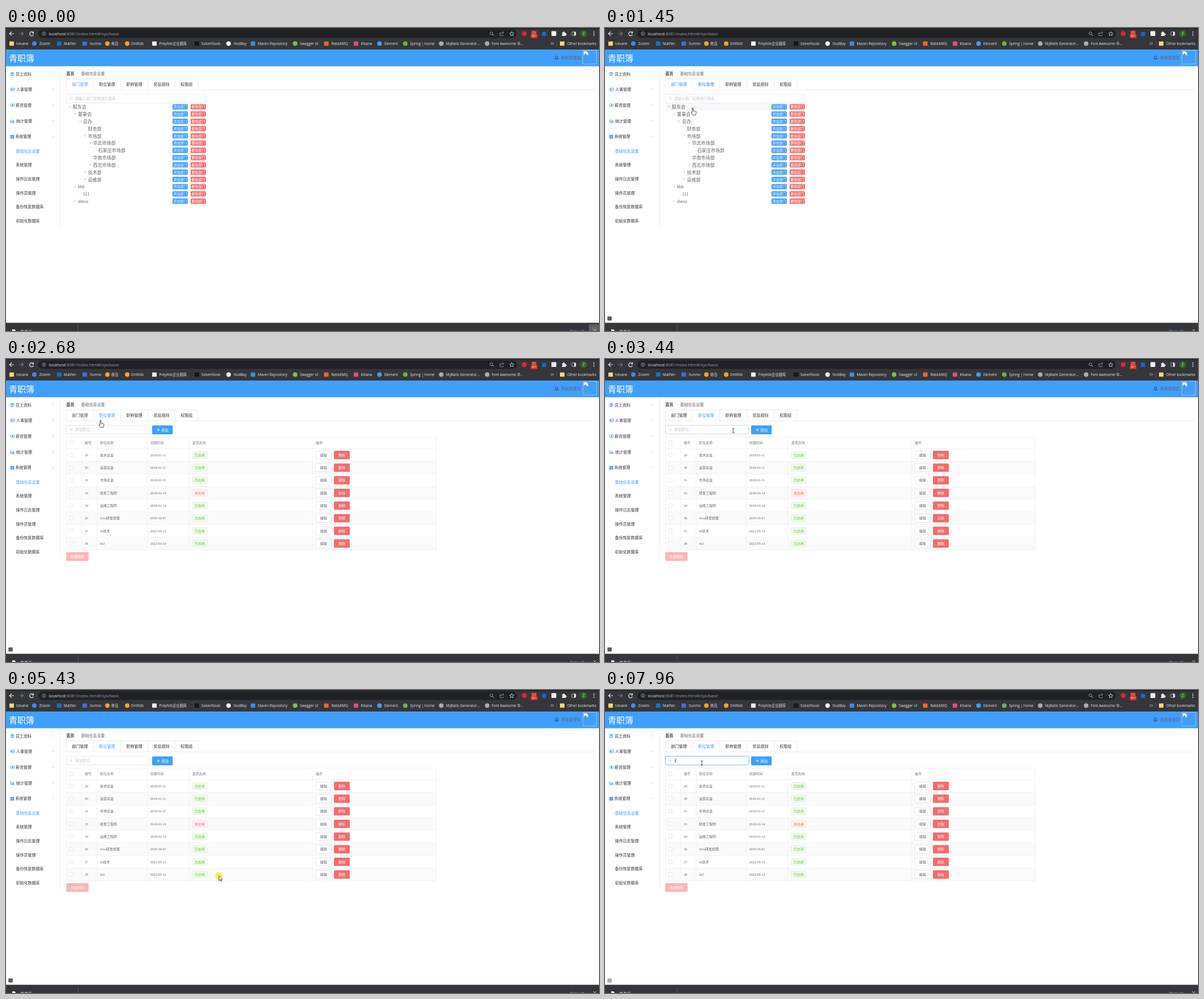
An HTML page for the animation above (8000 ms loop, 1047 px wide and 535 px high).

```html
<!DOCTYPE html>
<html>
<head>
<meta charset="utf-8">
<style>
html, body { margin: 0; width: 100%; height: 100%; overflow: hidden; background: #fff; }
svg { display: block; }
text { white-space: pre; font-family: "Liberation Serif", "Noto Sans CJK SC", "Noto Sans CJK", serif; }
.ui { font-family: "Open Sans", "Noto Sans CJK SC", "Noto Sans CJK", sans-serif; }
</style>
</head>
<body>
<svg id="stage" width="1047" height="535" viewBox="0 0 1047 535"></svg>
<script>
const LOOP = 8000;
const BLUE = '#409eff', RED = '#f56c6c', INK = '#303133', BODY = '#606266', MUTED = '#c0c4cc', LINE = '#ebeef5';

// Markup helpers; text is placed by its vertical centre.
const text = (x, cy, str, size = 7, fill = INK, attrs = '') =>
  `<text x="${x}" y="${cy + size * .37}" font-size="${size}" fill="${fill}" ${attrs}>${str}</text>`;
const middle = 'text-anchor="middle"';
const rect = (x, y, w, h, fill, attrs = '') =>
  `<rect x="${x}" y="${y}" width="${w}" height="${h}" fill="${fill}" ${attrs}/>`;
const box = (x, y, w, h, stroke, fill = '#fff', attrs = '') =>
  rect(x, y, w, h, fill, `rx="1.5" stroke="${stroke}" stroke-width=".7" ${attrs}`);
const dot = (x, y, r, fill, attrs = '') => `<circle cx="${x}" cy="${y}" r="${r}" fill="${fill}" ${attrs}/>`;
const line = (d, stroke, width = .7, attrs = '') =>
  `<path d="${d}" fill="none" stroke="${stroke}" stroke-width="${width}" ${attrs}/>`;
const shape = (d, fill, attrs = '') => `<path d="${d}" fill="${fill}" ${attrs}/>`;
const group = (id, body, attrs = '') => `<g id="${id}" ${attrs}>${body}</g>`;
const button = (x, cy, w, h, fill, label, size = 6) =>
  rect(x, cy - h / 2, w, h, fill, 'rx="1.5"') +
  text(x + w / 2, cy, label, size, '#fff', middle + ' font-weight="500"');

function browserTop() {
  const white = '#e8eaed', grey = '#9aa0a6';
  let s = rect(0, 0, 1047, 38, '#35363a') + rect(0, 0, 1047, 1.5, '#202124') +
    rect(57, 2.5, 845, 15, '#202124', 'rx="7.5"');
  s += line('M14 10H6.5M10 6.3L6.3 10L10 13.7', white, 1.2);
  s += line('M23 10h7.5M27 6.3L30.7 10L27 13.7', '#7d7f83', 1.1);
  s += line('M48 8A3.5 3.5 0 1 0 48.5 11.5M48.5 6v3h-3', white, 1.2);
  s += dot(67, 10, 3.2, 'none', `stroke="${grey}" stroke-width=".8"`) + line('M67 9.5v2.2M67 8v.8', white, .9);
  s += text(75.5, 10, `localhost<tspan fill="${grey}">:8081/index.html#/sys/basic</tspan>`, 7.2, white, 'class="ui"');
  s += dot(857, 9.3, 2.4, 'none', `stroke="${grey}"`) + line('M859 11.2l2.3 2.4', grey, 1.1);
  s += line('M874 8.5h-2v5h6v-2M873.5 11q0-3 5-3M876.8 6l2.2 2l-2.2 2', grey, .8);
  s += line('M893 6.3l1.1 2.5 2.7.3-2 1.8.6 2.7-2.4-1.4-2.4 1.4.6-2.7-2-1.8 2.7-.3Z', white, .8);
  s += dot(915, 10, 4.4, '#e0242b') + rect(928, 5, 8.5, 7, '#e34b3d', 'rx="1"') +
    rect(926.5, 11, 12, 7, '#d93025', 'rx="1.5"') + text(932.5, 14.5, '99+', 5, '#fff', 'class="ui" ' + middle);
  s += rect(946.5, 7, 7, 7, '#1967d2') + rect(963, 5.5, 8.5, 8.5, '#f1f1f1', 'rx="1"');
  s += shape('M981.5 8h2v-.6a1.3 1.3 0 0 1 2.6 0V8h2v2h.6a1.3 1.3 0 0 1 0 2.6h-.6v1.4h-6.6v-2a1.3 1.3 0 0 0 0-2.6Z', white);
  s += box(999, 6.8, 7, 6.4, white, 'none') + rect(1003, 6.8, 3, 6.4, white);
  s += dot(1020, 10, 6, '#33691e') + text(1020, 10, 'Z', 6.2, white, 'class="ui" ' + middle);
  for (const y of [7, 10, 13]) s += dot(1038, y, .9, white);

  const bookmarks = [
    [10, 18, 'tolvane', '#f8d775'], [50, 58.8, 'Zolvim', '#4285f4', 1], [94, 102, 'Mailfen', '#1670c4'],
    [139, 148, 'Xunmo', '#3d6ce0'], [179, 186, '练岛', '#f3a32c', 1], [214, 221, 'DrillNib', '#f3a32c', 1],
    [262, 270.5, 'PrepNib企业题库', '#f3f3f3'], [337, 345, 'SolverNook', '#10191f'],
    [393, 402, 'NodBay', '#f5f5f5', 1], [436, 444.5, 'Maven Repository', '#3d8de0'],
    [510.5, 519, 'Swagger UI', '#86bf3c', 1], [565.5, 574.5, 'RabbitMQ', '#f1652a'],
    [618, 626.5, 'Kibana', '#e9478c'], [659.5, 668, 'Element', BLUE, 1],
    [705, 713.5, 'Spring | Home', '#6db33f', 1], [768.5, 777, 'MyBatis Generator...', '#a9acb0', 1],
    [849.5, 857.5, 'Font Awesome 中...', '#a9acb0', 1], [982, 991, 'Other bookmarks', '#f8d775']
  ];
  for (const [ix, tx, label, color, round] of bookmarks) {
    s += round ? dot(ix, 27.5, 4, color) : rect(ix - 4, 23.7, 8, 7.6, color, 'rx=".6"');
    s += text(tx, 27.5, label, 6.25, white, 'class="ui"');
  }
  return s + line('M962 25.2l2 2.2-2 2.2M965 25.2l2 2.2-2 2.2', white, .8) + line('M972.5 23v9', '#5f6368');
}

function browserBottom() {
  return rect(0, 520.5, 1047, 15, '#35363a') + line('M127.5 524v11', '#5f6368') +
    shape('M11 532h4l2 2v2h-6Z', '#f1f1f1') +
    text(25, 536, '员表库', 7, '#e8eaed') + text(995.5, 535.5, 'Show all', 6.6, '#8ab4f8', 'class="ui"') +
    group('closeHover', rect(1029, 523, 18, 12, '#5b5c60') + text(1038, 530.5, '关闭', 5, '#8d8e91', middle)) +
    line('M1037 532l5 5M1042 532l-5 5', '#e8eaed', .9) +
    group('recorder', rect(4.3, 509.2, 7.6, 7.4, '#5c5c5c', 'rx="1.3"'));
}

function header() {
  return rect(0, 38, 1047, 29.5, BLUE) + text(5, 53.3, '青职簿', 15, '#fff') +
    line('M969 54.2h6.4M970 54v-2.2a2.2 2.2 0 0 1 4.4 0V54M971.5 55.6h1.4M972.2 49.5v-.7', INK, .8) +
    text(980, 52.8, '系统管理员', 7, BODY) +
    rect(1018.5, 39.5, 24, 24, 'none', 'stroke="#b9c4d0" stroke-width=".8"') +
    shape('M1020 41h5l2.5 2.5v4.5h-7.5Z', '#eef3f8') + shape('M1020 48l3-3.5 3 3.5Z', '#57a84f');
}

function sidebar() {
  const menu = [[81, 17, '员工资料'], [108.5, 18, '人事管理'], [136.5, 17, '薪资管理'], [164, 18, '统计管理'], [191.8, 16.5, '系统管理']];
  const sub = ['基础信息设置', '系统管理', '操作日志管理', '操作员管理', '备份恢复数据库', '初始化数据库'];
  let s = line('M96.5 67.5V352', '#e6e6e6');
  menu.forEach(([y, x, label], i) => {
    const up = i === 4 ? 1 : -1;
    s += text(x, y, label) + line(`M81 ${y - .3 + up}l2 ${-2 * up}l2 ${2 * up}`, '#a0a3a9', .6);
  });
  sub.forEach((label, i) => s += text(17.5, 217 + 24.7 * i, label, 7, i ? INK : BLUE));
  s += dot(11, 81.2, 3.2, 'none', `stroke="${BLUE}" stroke-width=".9"`) + dot(11, 80.2, 1.4, BLUE) + shape('M9 83.6q2-2.6 4 0Z', BLUE);
  s += box(8, 105.8, 7.6, 5.4, BLUE, 'none') + rect(9, 107.2, 2.4, 2.6, BLUE) + line('M12.2 107.5h2.4M12.2 109.3h2.4', BLUE);
  s += box(8, 133.8, 7.2, 5, BLUE, 'none') + dot(11.6, 136.3, 1.6, BLUE);
  s += line('M8.3 161v6h7.4M10.3 166.5v-2.4M12 166.5v-4.4M13.7 166.5v-3.4', BLUE, 1);
  for (const [x, y] of [[7.7, 188.8], [11.3, 188.8], [7.7, 192.2], [11.3, 192.2]]) s += rect(x, y, 3.2, 3, BLUE);
  return s;
}

function tabs() {
  const edges = [106.5, 154.5, 202.5, 250.5, 298.5, 339];
  const labels = ['部门管理', '职位管理', '职称管理', '奖惩规则', '权限组'];
  let s = text(106.5, 80, '首页', 7, INK, 'font-weight="700"') + line('M125.5 78l2 2l-2 2', MUTED, .6) +
    text(132.5, 80, '基础信息设置', 7, BODY);
  s += line('M106.5 109V91.5q0-1.8 1.8-1.8H337q2 0 2 1.8V109M106.5 109.2H1040' +
    edges.slice(1, -1).map(x => `M${x} 90V109`).join(''), '#e1e4ea');
  s += rect(107, 108.4, 47, 1.5, '#fff', 'id="open0"') + rect(155, 108.4, 47, 1.5, '#fff', 'id="open1"');
  labels.forEach((label, i) =>
    s += text((edges[i] + edges[i + 1]) / 2, 99.4, label, 7, INK, `${middle} id="tab${i}"`));
  return s;
}

function tree() {
  // depth, label, caret: 1 open, 0 closed, none for a leaf
  const nodes = [
    [0, '股东会', 1], [1, '董事会', 1], [2, '总办', 1], [3, '财务部'], [3, '市场部', 1], [4, '华北市场部', 1],
    [5, '石家庄市场部'], [4, '华南市场部'], [4, '西北市场部', 0], [3, '技术部', 0], [3, '运维部', 0],
    [1, 'bbb', 1], [2, '111'], [1, 'sbtest', 0]
  ];
  let s = box(106.5, 117, 246, 15.3, '#dcdfe6') + dot(114.7, 124, 2.2, 'none', `stroke="${MUTED}" stroke-width=".6"`) +
    line('M116.3 125.6l1.7 1.7', MUTED) + text(122, 124.8, '请输入部门名称进行搜索...', 6.5, MUTED) +
    rect(107, 133, 246, 12.6, '#f5f7fa', 'id="rowHover"');
  nodes.forEach(([depth, label, open], i) => {
    const y = 139.1 + 12.82 * i, x = 118 + 8.95 * depth;
    if (open === 1) s += shape(`M${x - 6.8} ${y - .8}h4l-2 2.2Z`, MUTED);
    if (open === 0) s += shape(`M${x - 6} ${y - 2}v4l2.2-2Z`, MUTED);
    s += text(x, y + .3, label, 8, BODY) + button(294, y, 27, 9.3, BLUE, '添加部门') + button(326, y, 27, 9.3, RED, '删除部门');
  });
  return s;
}

function positions() {
  const jobs = [
    [29, '技术总监', '2018-01-11'], [30, '运营总监', '2018-01-11'], [31, '市场总监', '2018-01-11'],
    [33, '研发工程师', '2018-01-14', 1], [34, '运维工程师', '2018-01-14'], [36, 'Java研发经理', '2019-10-01'],
    [37, 'sb技术', '2022-05-13'], [38, 'sb2', '2022-05-13']
  ];
  const columns = [139, 166, 254.5, 329, 547];
  const check = y => box(112, y - 3.3, 6.6, 6.6, '#dcdfe6');
  let s = box(106.5, 117, 147.5, 15.3, '#dcdfe6', '#fff', 'id="field"') +
    line('M112.3 124.7h5M114.8 122.2v5', MUTED, .6) +
    text(122, 124.8, '添加职位...', 6.5, MUTED, 'id="hint"') +
    text(122, 124.8, 's', 6.5, BODY, 'class="ui" id="typed"') + rect(121.6, 121.3, .7, 7.4, '#222', 'id="caret"');
  s += rect(258, 117.3, 36.3, 15.6, BLUE, 'rx="1.5"') + line('M266.5 125h5M269 122.5v5', '#fff', .8) +
    text(274, 125.1, '添加', 6.5, '#fff', 'font-weight="500"');
  ['编号', '职位名称', '创建时间', '是否启用', '操作'].forEach((label, i) =>
    s += text(columns[i], 148, label, 6, '#777a80', 'font-weight="500"'));
  s += check(148);
  jobs.forEach(([id, name, date, off], i) => {
    const top = 158.4 + 22.32 * i, y = top + 11;
    if (i % 2) s += rect(106.5, top, 653, 22.3, '#fafafa');
    s += line(`M106.5 ${top}H759.5`, LINE) + check(y);
    [id, name, date].forEach((cell, c) => s += text(columns[c], y + .2, cell, 6, BODY));
    s += box(328.8, y - 6.3, 26.6, 12.6, off ? '#fde2e2' : '#e1f3d8', off ? '#fef0f0' : '#f0f9eb') +
      text(342, y, off ? '未启用' : '已启用', 6, off ? RED : '#67c23a', middle);
    s += box(546.7, y - 7, 27.6, 14.3, '#dcdfe6') + text(560.5, y, '编辑', 6, BODY, middle) +
      button(579, y + .1, 28, 14.8, RED, '删除');
  });
  s += rect(106.5, 138, 653, 199, 'none', `stroke="${LINE}" stroke-width=".8"`) +
    line([133.5, 161, 249.5, 323.5, 541.5].map(x => `M${x} 138V337`).join(''), LINE);
  return s + button(106.3, 348.8, 39.5, 15.6, '#fab6b6', '批量删除');
}

function pointer() {
  const outline = 'stroke="#222" stroke-width=".8" stroke-linejoin="round"';
  return group('pointer',
    dot(0, 0, 6.3, '#ffe81a', 'id="click" fill-opacity=".75"') +
    shape('M0 0V8.6l2-1.8 1.5 3.2 1.4-.6-1.5-3.2H6Z', '#fff', outline + ' id="arrow"') +
    shape('M-1 1q0-1 .9-1t.9 1v4.2l4 .8q1.4.3 1.2 1.7l-.6 3.2-.7 2H.3L-2.8 8.6q-.5-1.1.5-1.3l1.3.9Z', '#fff', outline + ' id="hand"') +
    line('M-2-4q2 0 2 1q0-1 2-1M0-3V3M-2 4q2 0 2-1q0 1 2 1', '#222', .8, 'id="beam"'));
}

document.getElementById('stage').innerHTML = browserTop() + header() + sidebar() + tabs() +
  group('tree', tree()) + group('positions', positions()) + browserBottom() + pointer();

// Plays a table of [ms, value] on one property; values hold when stepped.
function play(id, prop, table, stepped = true) {
  const points = [...table], first = table[0], last = table[table.length - 1];
  if (first[0] > 0) points.unshift([0, first[1]]);
  if (last[0] < LOOP) points.push([LOOP, last[1]]);
  const frames = points.map(([ms, value]) =>
    ({ offset: ms / LOOP, [prop]: value, easing: stepped ? 'steps(1, end)' : 'linear' }));
  document.getElementById(id).animate(frames, { duration: LOOP, iterations: Infinity });
}
// Shown only inside the listed [from, to] spans.
function show(id, ...spans) {
  const table = spans.flatMap(([from, to]) => [[from, 1], [to, 0]]);
  if (table[0][0] > 0) table.unshift([0, 0]);
  play(id, 'opacity', table);
}

const SWITCH = 2480;
show('closeHover', [0, 70]);
show('open0', [0, SWITCH]);
show('tree', [0, SWITCH]);
show('open1', [SWITCH, LOOP]);
show('positions', [SWITCH, LOOP]);
show('rowHover', [1380, 2010]);
play('recorder', 'opacity', [[0, 0], [410, .5], [480, 1], [7820, .5]]);
play('tab0', 'fill', [[0, BLUE], [SWITCH, BLUE], [2750, INK]], false);
play('tab1', 'fill', [[0, INK], [1160, INK], [1300, BLUE], [1390, BLUE], [1600, INK], [2080, INK], [2290, BLUE]], false);

play('field', 'stroke', [[0, '#dcdfe6'], [3230, MUTED], [3580, BLUE], [5430, '#dcdfe6'], [6510, MUTED], [7130, BLUE]]);
show('hint', [0, 7690]);
show('typed', [7690, LOOP]);
show('caret', [3580, 4060], [4560, 5060], [7130, 7620], [7690, LOOP]);
play('caret', 'transform', [[0, 'translateX(0px)'], [7690, 'translateX(3px)']]);

show('arrow', [270, 1170], [3020, 3200], [4130, 6370]);
show('hand', [1170, 3020]);
show('beam', [3200, 4130], [6370, LOOP]);
show('click', [2340, SWITCH], [3580, 3660], [5360, 5500], [7060, 7210]);
play('pointer', 'transform', [
  [270, 880, 508], [620, 600, 300], [1030, 312, 112], [1240, 180, 100], [1400, 155, 141], [1870, 155, 141],
  [2280, 167, 108], [2890, 167, 108], [3200, 205, 123], [3420, 226.5, 126.5], [4060, 226.5, 126.5],
  [4330, 560, 325], [4450, 400, 336], [4590, 167.5, 320], [4680, 167.5, 320], [4750, 176, 322], [5080, 176, 322],
  [5360, 376, 328], [5500, 376, 328], [5570, 300, 326], [5900, 300, 326], [6040, 376, 327], [6240, 376, 327],
  [6420, 172.3, 130], [6500, 172.3, 130], [6720, 172, 120], [6860, 172, 120], [6920, 171, 129]
].map(([ms, x, y]) => [ms, `translate(${x}px, ${y}px)`]), false);
</script>
</body>
</html>
```
